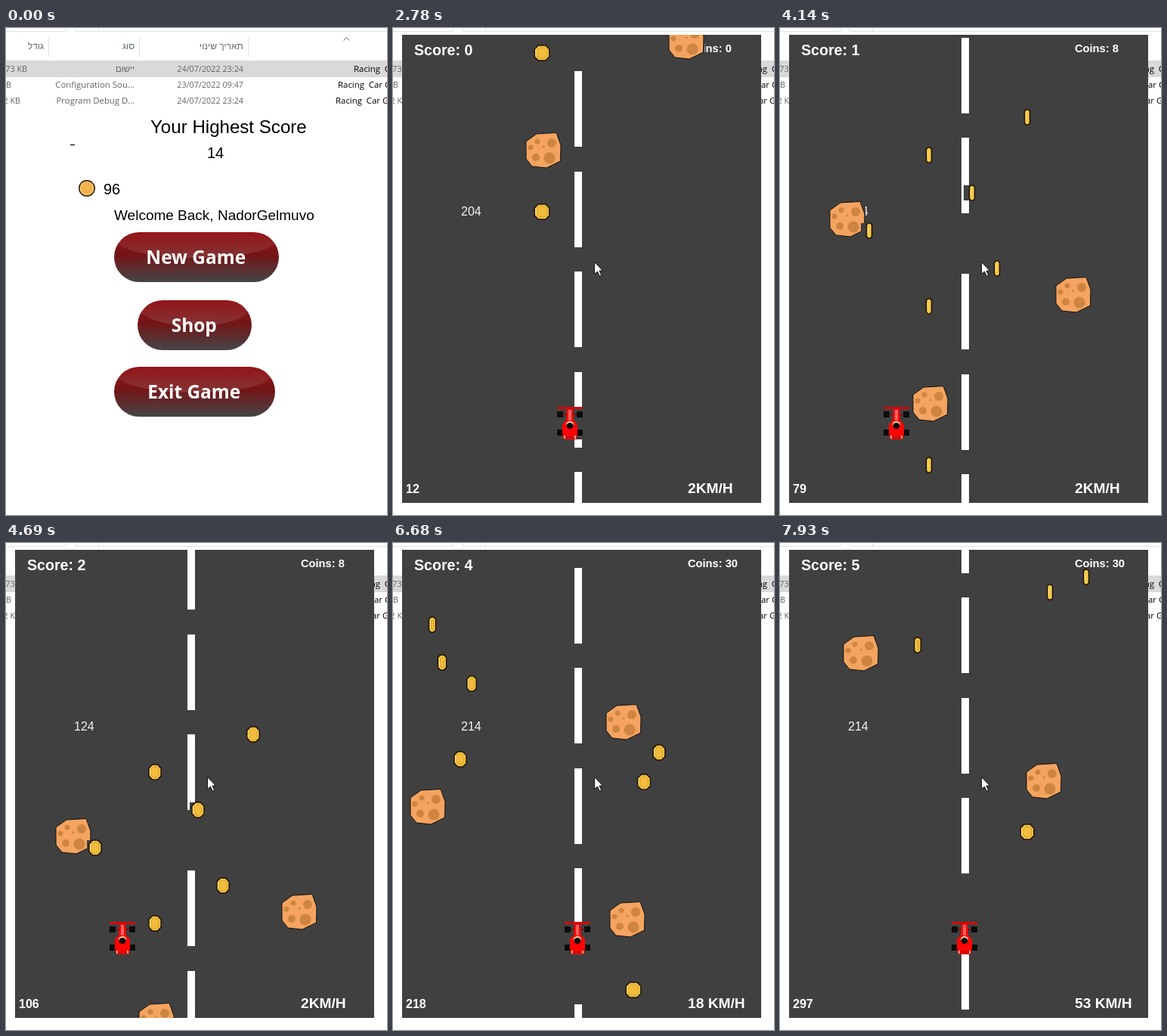
Recreate the animation shown at these times as an HTML page with a canvas. Size 504 px wide and 644 px high, loop 8000 ms.

```html
<!DOCTYPE html>
<html lang="en">
<head>
<meta charset="utf-8">
<title>Car game</title>
<style>
html, body { margin: 0; width: 100%; height: 100%; overflow: hidden; background: #fff; }
canvas { display: block; }
</style>
</head>
<body>
<canvas id="stage" width="504" height="644"></canvas>
<script>
const ctx = document.getElementById('stage').getContext('2d');
const LOOP = 8000, STEP = 62.5, LAST = 127, GAME_START = 40;
const ROAD = '#404040';
const ARIAL = '"Liberation Sans", Arial, sans-serif';
const HUMANIST = '"Open Sans", "Noto Sans", sans-serif';

const mod = (a, n) => ((a % n) + n) % n;
const beyond = (value, limit) => Math.max(0, value - limit);
// Goes from 0 to 1 while v runs from a to b.
const ramp = (v, a, b) => Math.min(1, beyond(v, a) / (b - a));

function rect(x, y, w, h, color) {
  ctx.fillStyle = color;
  ctx.fillRect(x, y, w, h);
}
function text(str, x, y, size, { color = '#000', weight = 400, family = ARIAL, align = 'left' } = {}) {
  ctx.font = `${weight} ${size}px ${family}`;
  ctx.textAlign = align;
  ctx.fillStyle = color;
  ctx.fillText(str, x, y);
}
function shape(path, fill, stroke, width = 1) {
  const p = new Path2D(path);
  if (fill) { ctx.fillStyle = fill; ctx.fill(p); }
  if (stroke) { ctx.strokeStyle = stroke; ctx.lineWidth = width; ctx.stroke(p); }
}
function ellipse(x, y, rx, ry, color) {
  ctx.beginPath();
  ctx.ellipse(x, y, rx, ry, 0, 0, 7);
  ctx.fillStyle = color;
  ctx.fill();
}
function placed(x, y, draw) {
  ctx.save();
  ctx.translate(x, y);
  draw();
  ctx.restore();
}
function clipped(x, y, w, h, draw) {
  ctx.save();
  ctx.beginPath();
  ctx.rect(x, y, w, h);
  ctx.clip();
  draw();
  ctx.restore();
}

// ---------- File list behind the windows ----------
function fileList() {
  const edge = '#e2e2e2', head = { color: '#5d6672', align: 'right' };
  shape('M0 4.5H79.5V0M92.5 0V4.5H504M122.5 0V4.5', null, edge);
  shape('M56.5 12V38M176.5 12V38M320.5 12V38', null, edge);
  shape('M446.5 16.5L450.5 12.5L454.5 16.5', null, '#6b6b6b');
  text('גודל', 50, 28, 12, head);
  text('סוג', 170, 28, 12, head);
  text('תאריך שינוי', 314, 28, 12, head);

  rect(0, 43, 504, 22, '#d9d9d9');
  const rows = [
    ['73 KB', 28, 'יישום', '24/07/2022 23:24', 'Racing  Car', 460],
    ['B', 7, 'Configuration Sou...', '23/07/2022 09:47', 'Racing  Car C', 439],
    ['2 KB', 19, 'Program Debug D...', '24/07/2022 23:24', 'Racing  Car G', 436]
  ];
  const cell = { color: '#636363', family: HUMANIST, align: 'right' };
  rows.forEach(([size, sizeX, kind, date, name, nameX], i) => {
    const y = 58 + 21 * i;
    text(size, sizeX, y, 10.8, cell);
    text(kind, 170, y, 11.4, cell);
    text(date, 314, y, 10.8, cell);
    text(name, nameX, y, 11.4, { family: HUMANIST });
  });
}

// ---------- Menu ----------
function button(x, y, w, label) {
  const h = 66;
  ctx.save();
  ctx.beginPath();
  ctx.roundRect(x, y, w, h, h / 2);
  ctx.clip();
  const body = ctx.createLinearGradient(0, y, 0, y + h);
  body.addColorStop(0, '#951618');
  body.addColorStop(.45, '#741416');
  body.addColorStop(1, '#454546');
  rect(x, y, w, h, body);
  const gloss = ctx.createLinearGradient(0, y, 0, y + 34);
  gloss.addColorStop(0, 'rgba(255,255,255,0)');
  gloss.addColorStop(1, 'rgba(255,255,255,.14)');
  ellipse(x + w / 2, y + 10, w / 2 - 3, 24, gloss);
  ctx.restore();
  text(label, x + w / 2 - .8, y + 42, 24.4, { color: '#fff', weight: 700, family: HUMANIST, align: 'center' });
}

function sportsCar(step) {
  const dark = '#25253a';
  clipped(85, 128, 84, 32, () => placed(85 - 78 * (1 - ramp(step, 0, 11)), 131, () => {
    shape('M4 23.5H84', null, dark, 1.5);
    shape('M1 17Q0 10 6 8Q19 6 27 2Q36 -.5 45 1Q53 3 60 9Q74 11 78 17V23H3Z', '#d62c3c');
    shape('M27 8Q33 3 40 3Q47 4 53 9Z', '#29293f');
    shape('M7 14H74M39 9L37 21', null, '#a82439');
    rect(25, 18, 31, 2, '#3a2034');
    for (const x of [12, 68]) {
      ellipse(x, 20, 7, 7, dark);
      ellipse(x, 20, 4.5, 4.5, '#8b8c9b');
      ellipse(x, 20, 2, 2, dark);
    }
  }));
}

function menu(step) {
  text('Your Highest Score', 191, 139, 24.1);
  text('14', 266, 172, 20);
  text('96', 129, 220, 20);
  text('Welcome Back, NadorGelmuvo', 143, 254, 19);
  ellipse(107, 212, 11, 11, '#2b1608');
  ellipse(107, 212, 9.6, 9.6, '#f7c166');
  ellipse(107, 212, 7.5, 7.5, '#f3b24c');
  button(143, 270, 218, 'New Game');
  button(174, 360, 151, 'Shop');
  button(143, 448, 213, 'Exit Game');
  sportsCar(step);
}

// ---------- Game ----------
// Heights are those at zero travel; negative ones wait above the road.
const rocks = [
  [65, 99], [364, 199], [175, 343], [286, -429],
  [22, -578], [281, -690], [325, -1181], [83, -1350]
];
const coinRows = [
  { top: 448, gap: 0, xs: [197] },
  { top: -12, gap: 50, xs: [327, 197, 254, 118, 287, 197] },
  { top: -312, gap: 0, xs: [318] },
  { top: -626, gap: 39, xs: [352, 332] },
  { top: -717, gap: 100, xs: [104, 89] },
  { top: -795, gap: 50, xs: [52, 65] },
  { top: -1337, gap: 247, xs: [182, 327] },
  { top: -1427, gap: 20, xs: [405, 357] }
];

function rock(x, y) {
  placed(x, y, () => {
    rect(0, 0, 48, 48, ROAD);
    shape('M1 12L15 2L41 .5L47 17L46.5 38L28 47L9 45L1 35Z', '#f4a460', '#111');
    for (const [cx, cy, r] of [[35, 14, 6], [32, 34, 7.5], [14, 33, 5], [16, 12, 3.5], [7, 20, 3.5], [24, 19, 1.5]])
      ellipse(cx, cy, r, r, '#cd853f');
  });
}

function coin(x, y, width) {
  placed(x, y, () => {
    rect(-11, -10, 22, 20, ROAD);
    const w = width / 2, c = Math.min(5, w * .6);
    const outline = (w, h, c) =>
      `M${-w + c} ${-h}H${w - c}L${w} ${-h + c}V${h - c}L${w - c} ${h}H${-w + c}L${-w} ${h - c}V${-h + c}Z`;
    shape(outline(w, 10, c), '#f6c845', '#1c1206', 1.5);
    if (width > 8) shape(outline(w - 3, 7, c * .6), '#f2bd3c', '#d99a2b');
    rect(-w + 1.5, -5, 1, 9, '#ffe79a');
  });
}

function raceCar(x, y) {
  placed(x, y, () => {
    rect(0, 0, 34, 43, ROAD);
    for (const axle of [6, 30]) {
      rect(6, axle + 3, 22, 2, '#7d0d0d');
      rect(0, axle, 8, 8, '#0c0c0c');
      rect(26, axle, 8, 8, '#0c0c0c');
    }
    rect(0, 0, 34, 3, '#d00b0b');
    shape('M13 3H21L22 18L27 23V36L25 43H9L7 36V23L12 18Z', '#fb0505');
    rect(15, 4, 4, 14, '#f2605c');
    rect(9, 39, 16, 3, '#c80d0d');
    rect(9, 38, 2, 4, '#f2a08a');
    rect(23, 38, 2, 4, '#f2a08a');
    ellipse(17, 23, 5, 4, '#f3d3a0');
    ellipse(17, 25, 4.5, 4, '#080808');
  });
}

// Game ticks come a little faster as the game goes on.
const ticksAt = step => Math.floor(1e-6 +
  53 * ramp(step, 40, 57) + 53 * ramp(step, 57, 75) + 58 * ramp(step, 75, 92) +
  54 * ramp(step, 92, 107) + 79 * ramp(step, 107, 127));

// Things on the road gain speed twice; the lane markings accelerate steadily.
const travelAt = ticks => 5 * (ticks - 53) + .7 * beyond(ticks, 106) + 1.5 * beyond(ticks, 218);
function laneAt(ticks) {
  const u = ticks - 106;
  return 212 + (u < 0 ? 4 * u : u * (3.494 + .03543 * u + 3.65e-5 * u * u));
}

function game(step) {
  rect(12, 9, 475, 619, ROAD);
  const ticks = ticksAt(step), travel = travelAt(ticks), lane = laneAt(ticks);
  const steps = 8 * ramp(step, 59, 64) - 13 * ramp(step, 75, 78) +
    2 * ramp(step, 88, 92) + 2 * ramp(step, 101, 103);
  const carX = 204 - 10 * Math.round(steps);
  const coinCount = Math.floor(8 * ramp(step, 60, 63) + 11 * ramp(step, 77, 80) + 11 * ramp(step, 83, 86));
  const speed = Math.floor(2 + 9 * ramp(step, 80, 92) + 7 * ramp(step, 92, 107) + 35 * ramp(step, 107, 127));

  for (let i = 0; i < 5; i++)
    rect(240, Math.round(mod(312 + 132.5 * i + lane, 710) - 91), 10, 100, '#fff');

  const bold = { color: '#fff', weight: 700 };
  text(`Score: ${Math.floor(ticks / 50)}`, 28, 36, 19.6, bold);
  text(`Coins: ${coinCount}`, 390, 32, 14.67, bold);
  text(carX, 90, 248, 16, { color: '#f4f4f4' });
  text(ticks, 17, 615, 16, bold);
  text(speed > 2 ? `${speed} KM/H` : '2KM/H', 390, 615, 19.2, bold);

  for (const [x, y] of rocks) rock(x, Math.round(y + travel));
  for (const { top, gap, xs } of coinRows) {
    xs.forEach((x, i) => {
      const y = top + gap * i;
      const turn = 3 + beyond(-y, 0) / 120 + (step - 57) * 5 / 18;
      coin(x, Math.round(y + travel), Math.max(7, 20 * Math.abs(Math.cos(turn * Math.PI / 10))));
    });
  }
  raceCar(carX + 13, 501);
}

function pointer(step) {
  const enter = ramp(step, 0, 13), press = ramp(step, 33, 38);
  placed(Math.round(484 - 204 * enter - 14 * press), Math.round(650 - 469 * enter + 128 * press), () =>
    shape('M.5 .5V16.5L4.5 13L7.2 19L9.7 18L7 12H11.5Z', '#fff', '#111'));
}

function render() {
  const ms = performance.now() % LOOP;
  const step = Math.min(LAST, Math.floor((ms + 15) / STEP));
  rect(0, 0, 504, 644, '#fff');
  fileList();
  if (step < GAME_START) menu(step);
  else clipped(12, 9, 475, 619, () => game(step));
  pointer(step);
  requestAnimationFrame(render);
}
render();
</script>
</body>
</html>
```
